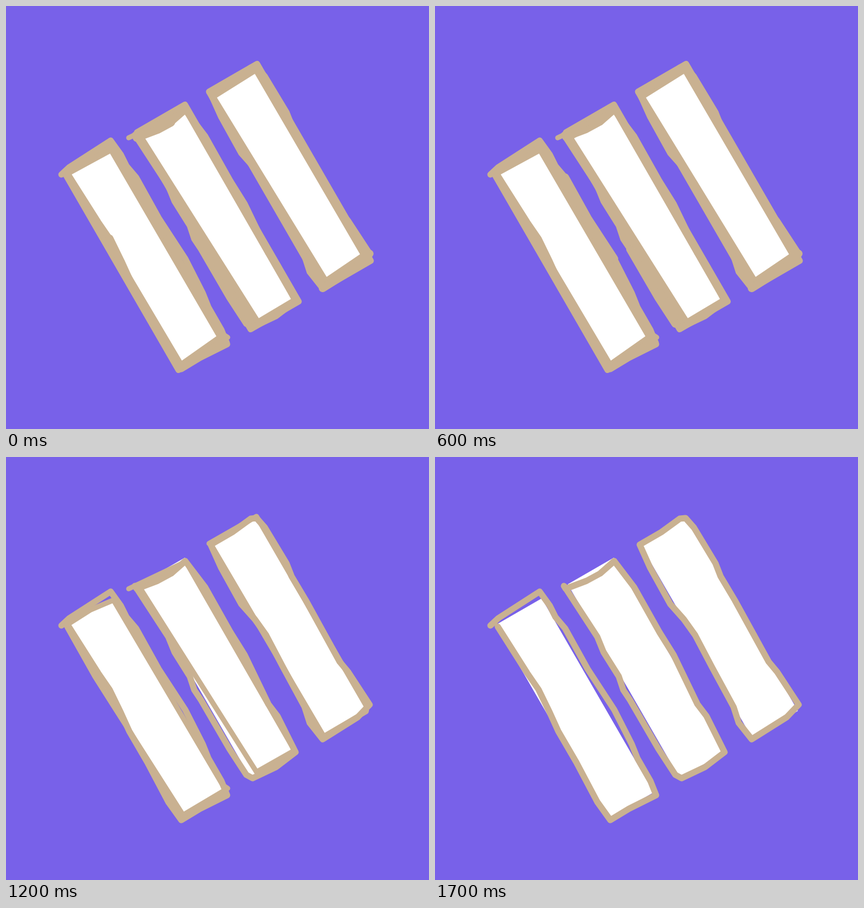
An HTML page with a canvas that plays this animation: 748x748 px, repeating every 1.9 s.

```html
<!DOCTYPE html>
<html lang="en">
<head>
<meta charset="utf-8">
<style>
  html, body { margin: 0; width: 100%; height: 100%; overflow: hidden; background: #7861e9; }
  canvas { display: block; width: 748px; height: 748px; }
</style>
</head>
<body>
<canvas id="stage" width="748" height="748"></canvas>
<script>
const ctx = document.getElementById('stage').getContext('2d');
const PURPLE = '#7861e9', TAN = '#c9b191', WHITE = '#fff';
const STEP = 100, LOOP = 1900, LAST = 17;
const PEN_WIDTH = 11;

// Key points per bar: the wobbly pen line, a quicker second pass, and the
// corners of the white left over once the frame is drawn heavily.
const bars = [
  {
    pen: [98,298, 112,285, 185,238, 203,263, 213,283, 230,303, 270,375, 317,447, 348,508, 358,533, 381,573,
      391,598, 343,622, 310,642, 287,610, 250,540, 218,485, 203,452, 183,411, 163,382, 111,300],
    second: [106,298, 150,270, 190,253, 383,580, 392,586, 313,633, 190,440, 157,388, 108,301],
    inside: [116,298, 184,261, 372,584, 311,627]
  },
  {
    pen: [228,228, 231,233, 268,219, 292,206, 317,184, 352,230, 397,310, 422,350, 464,437, 480,458, 512,522,
      478,548, 436,568, 425,562, 395,516, 345,430, 333,412, 325,388, 298,345, 287,318, 229,229],
    second: [217,233, 318,185, 510,519, 443,557, 238,233],
    inside: [246,234, 316,191, 504,518, 447,552]
  },
  {
    pen: [362,155, 400,133, 433,109, 443,108, 458,125, 496,188, 505,211, 530,253, 590,362, 605,380, 643,438,
      622,460, 560,499, 537,470, 528,442, 490,372, 460,315, 440,287, 416,260, 380,195, 362,155],
    second: [359,153, 443,105, 638,442, 637,450, 562,494, 364,157],
    inside: [373,162, 440,120, 626,439, 567,479]
  }
];

// Corners of a rectangle on the axis of a bar, tilted by 30 degrees.
function tilted(index, width, height) {
  const x = 374.5 + 127.5 * (index - 1), y = 373 - 72 * (index - 1);
  const cos = Math.cos(Math.PI / 6), sin = 0.5;
  return [[-1, -1], [1, -1], [1, 1], [-1, 1]].flatMap(([sx, sy]) => {
    const u = sx * width / 2, v = sy * height / 2;
    return [x + u * cos + v * sin, y - u * sin + v * cos];
  });
}

function trace(points) {
  ctx.beginPath();
  for (let i = 0; i < points.length; i += 2) ctx.lineTo(points[i], points[i + 1]);
}

function fill(points, color) {
  trace(points);
  ctx.fillStyle = color;
  ctx.fill();
}

function stroke(points, width, closed = false) {
  trace(points);
  if (closed) ctx.closePath();
  ctx.lineWidth = width;
  ctx.strokeStyle = TAN;
  ctx.stroke();
}

function random(seed) {
  const value = Math.sin(seed * 12.9898) * 43758.5453;
  return value - Math.floor(value);
}

// One short stretch of the pen line is retraced a little wider at each step.
function retrace(pen, seed) {
  const from = 2 * Math.floor(random(seed) * (pen.length / 2 - 3));
  stroke(pen.slice(from, from + 6), PEN_WIDTH + 3);
}

function drawHeavy(bar, index, step) {
  const frame = tilted(index, 98, 402);
  fill(frame, TAN);
  stroke(frame, PEN_WIDTH, true);
  stroke(bar.second, 9);
  fill(bar.inside, WHITE);
  stroke(bar.pen, PEN_WIDTH);
  retrace(bar.pen, step * bars.length + index + 1);
}

function drawLines(bar, index, twice) {
  fill(tilted(index, 94, 396), WHITE);
  stroke(bar.pen, PEN_WIDTH);
  if (twice) stroke(bar.second, 9);
}

function draw(step) {
  ctx.fillStyle = PURPLE;
  ctx.fillRect(0, 0, 748, 748);
  // The ending alternates between two passes, all passes and one pass.
  const ending = step >= 12 ? step % 3 : 1;
  bars.forEach((bar, index) => {
    if (ending === 1) drawHeavy(bar, index, step);
    else drawLines(bar, index, ending === 0);
  });
}

ctx.lineCap = ctx.lineJoin = 'round';
const start = performance.now();
function tick() {
  const time = (performance.now() - start) % LOOP;
  draw(Math.min(LAST, Math.floor(time / STEP)));
  requestAnimationFrame(tick);
}
tick();
</script>
</body>
</html>
```
